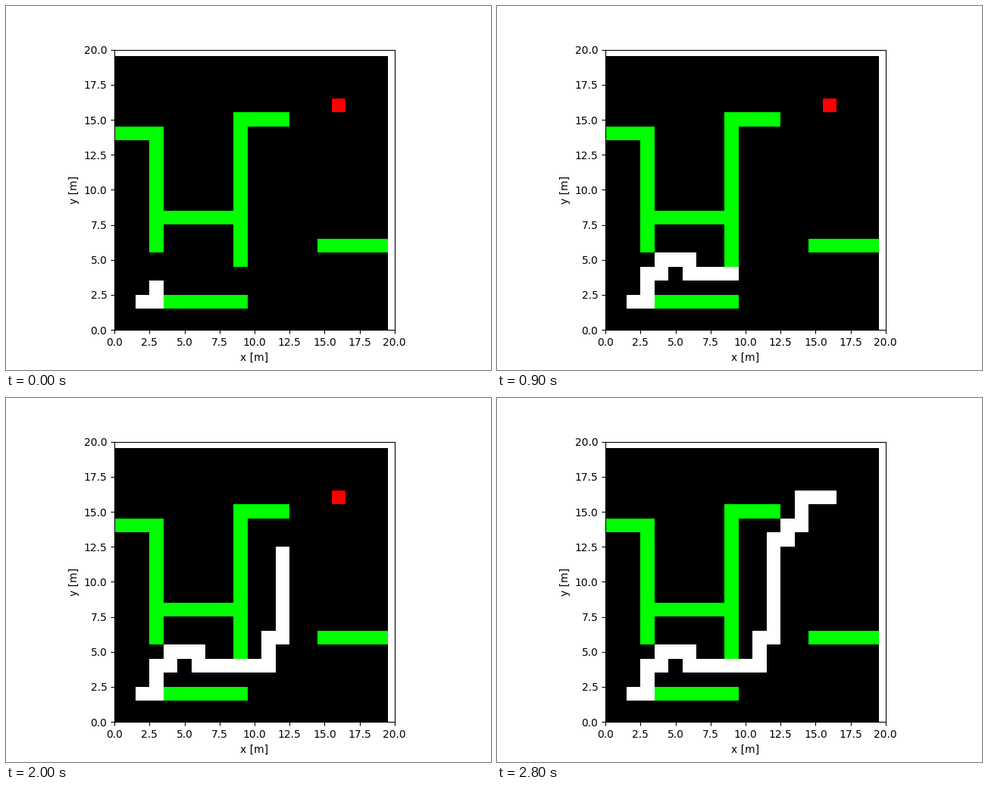
These frames come from a looping animation (640x480 px, 3900 ms). A matplotlib script:

```python
import matplotlib.pyplot as plt
import numpy as np
from matplotlib.animation import FuncAnimation

SIZE = 20
FRAMES, INTERVAL = 39, 100
GREEN, RED, WHITE = (0, 255, 0), (255, 0, 0), (255, 255, 255)
START, GOAL = (2, 2), (16, 16)
START_LENGTH = 3

# Walls as inclusive cell ranges: x0, x1, y0, y1
WALLS = [
    (0, 3, 14, 14), (3, 3, 6, 14), (3, 9, 8, 8), (9, 9, 5, 15),
    (9, 12, 15, 15), (15, 19, 6, 6), (4, 9, 2, 2),
]
STEPS = {"R": (1, 0), "U": (0, 1), "D": (0, -1)}
MOVES = "RUURURRD" + "R" * 5 + "UUR" + "U" * 7 + "RURUURR"


def walk(start, moves):
    cells = [start]
    for move in moves:
        (x, y), (dx, dy) = cells[-1], STEPS[move]
        cells.append((x + dx, y + dy))
    return cells


def build_map():
    grid = np.zeros((SIZE, SIZE, 3), dtype=np.uint8)
    for x0, x1, y0, y1 in WALLS:
        grid[y0:y1 + 1, x0:x1 + 1] = GREEN
    grid[GOAL[1], GOAL[0]] = RED
    return grid


PATH = walk(START, MOVES)
BASE = build_map()

fig, ax = plt.subplots(figsize=(6.4, 4.8), dpi=100)
image = ax.imshow(BASE, origin="lower", interpolation="nearest")
ax.set(xlim=(0, SIZE), ylim=(0, SIZE), xlabel="x [m]", ylabel="y [m]")
ticks = np.arange(0, SIZE + 1, 2.5)
ax.set_xticks(ticks)
ax.set_yticks(ticks)


def update(frame):
    grid = BASE.copy()
    for x, y in PATH[:START_LENGTH + frame]:
        grid[y, x] = WHITE
    image.set_data(grid)
    return [image]


anim = FuncAnimation(fig, update, frames=FRAMES, interval=INTERVAL,
                     init_func=lambda: update(0), repeat=True, repeat_delay=0)
plt.show()
```
